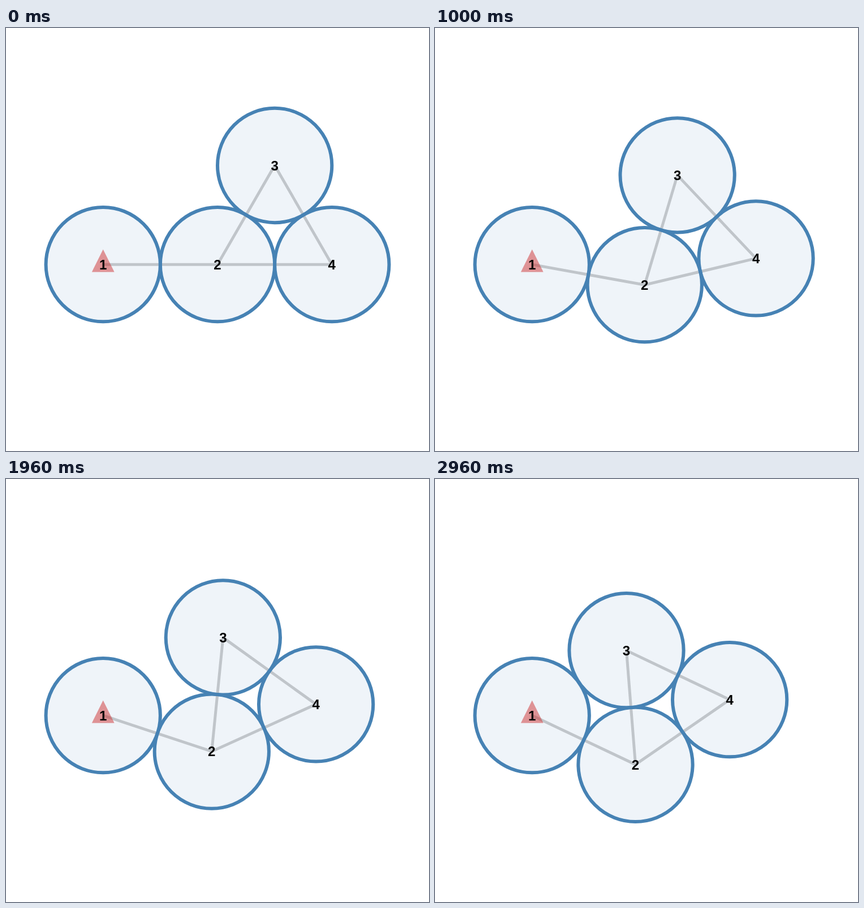
Recreate the animation shown at these times as an HTML page. Size 748 by 748 pixels, loop 3 s.

```html
<!DOCTYPE html>
<html>
<head>
<meta charset="utf-8">
<style>
  html, body { margin: 0; width: 100%; height: 100%; overflow: hidden; background: #fff; }
  svg { display: block; width: 100vw; height: 100vh; }
  .edge { stroke: #ccc; stroke-width: 5; }
  .disc { fill: rgba(70, 130, 180, .085); stroke: #4682b4; stroke-width: 6; }
  .pin { fill: rgba(205, 51, 51, .5); }
  text { font: bold 24px "Liberation Sans", Arial, sans-serif; text-anchor: middle; }
</style>
</head>
<body>
<svg id="stage" viewBox="0 0 748 748"></svg>
<script>
const LENGTH = 202.3, PIN = { x: 171.7, y: 418.2 };
const FRAME = 40, COUNT = 75, STEP = 0.0125, SUBSTEPS = 10;
const EDGES = [[0, 1], [1, 2], [1, 3], [2, 3]];
const stage = document.getElementById('stage');

function add(tag, attrs, label = '') {
  const el = document.createElementNS('http://www.w3.org/2000/svg', tag);
  set(el, attrs);
  el.textContent = label;
  return stage.appendChild(el);
}

function set(el, attrs) {
  for (const key in attrs) el.setAttribute(key, attrs[key]);
}

// Unit-speed motion of the linkage with no angular momentum about the pin.
// fold = arm turn + triangle turn (opposite directions)
function rates(fold) {
  const c = Math.cos(Math.PI / 6 + fold) / Math.sqrt(3);
  const arm = (2 + 3 * c) / (5 + 6 * c), tri = 1 - arm;
  const speed = Math.sqrt(3 * arm * arm + 2 * tri * tri - 6 * arm * tri * c);
  return { arm: arm / speed, tri: tri / speed };
}

function buildPoses() {
  const poses = [], h = STEP / SUBSTEPS;
  let arm = 0, tri = 0;
  for (let i = 0; i < COUNT; i++) {
    poses.push({ arm, tri });
    for (let k = 0; k < SUBSTEPS; k++) {
      const start = rates(arm + tri);
      const mid = rates(arm + tri + (start.arm + start.tri) * h / 2);
      arm += mid.arm * h;
      tri += mid.tri * h;
    }
  }
  return poses;
}

const from = (p, angle) => ({
  x: p.x + LENGTH * Math.cos(angle),
  y: p.y + LENGTH * Math.sin(angle)
});

function nodes({ arm, tri }) {
  const hub = from(PIN, arm);
  return [PIN, hub, from(hub, -tri - Math.PI / 3), from(hub, -tri)];
}

const poses = buildPoses();
const lines = EDGES.map(() => add('line', { class: 'edge' }));
const discs = [1, 2, 3, 4].map(() => add('circle', { class: 'disc', r: LENGTH / 2 }));
add('path', { class: 'pin', d: 'M171.7 391.5L191.6 431.6H151.8Z' });
const labels = [1, 2, 3, 4].map(n => add('text', {}, n));

function draw(time) {
  const points = nodes(poses[Math.floor(time / FRAME) % COUNT]);
  EDGES.forEach(([a, b], i) => set(lines[i], {
    x1: points[a].x, y1: points[a].y, x2: points[b].x, y2: points[b].y
  }));
  points.forEach(({ x, y }, i) => {
    set(discs[i], { cx: x, cy: y });
    set(labels[i], { x, y: y + 8.8 });
  });
}

const begin = performance.now();
function tick() {
  draw(performance.now() - begin);
  requestAnimationFrame(tick);
}
tick();
</script>
</body>
</html>
```
